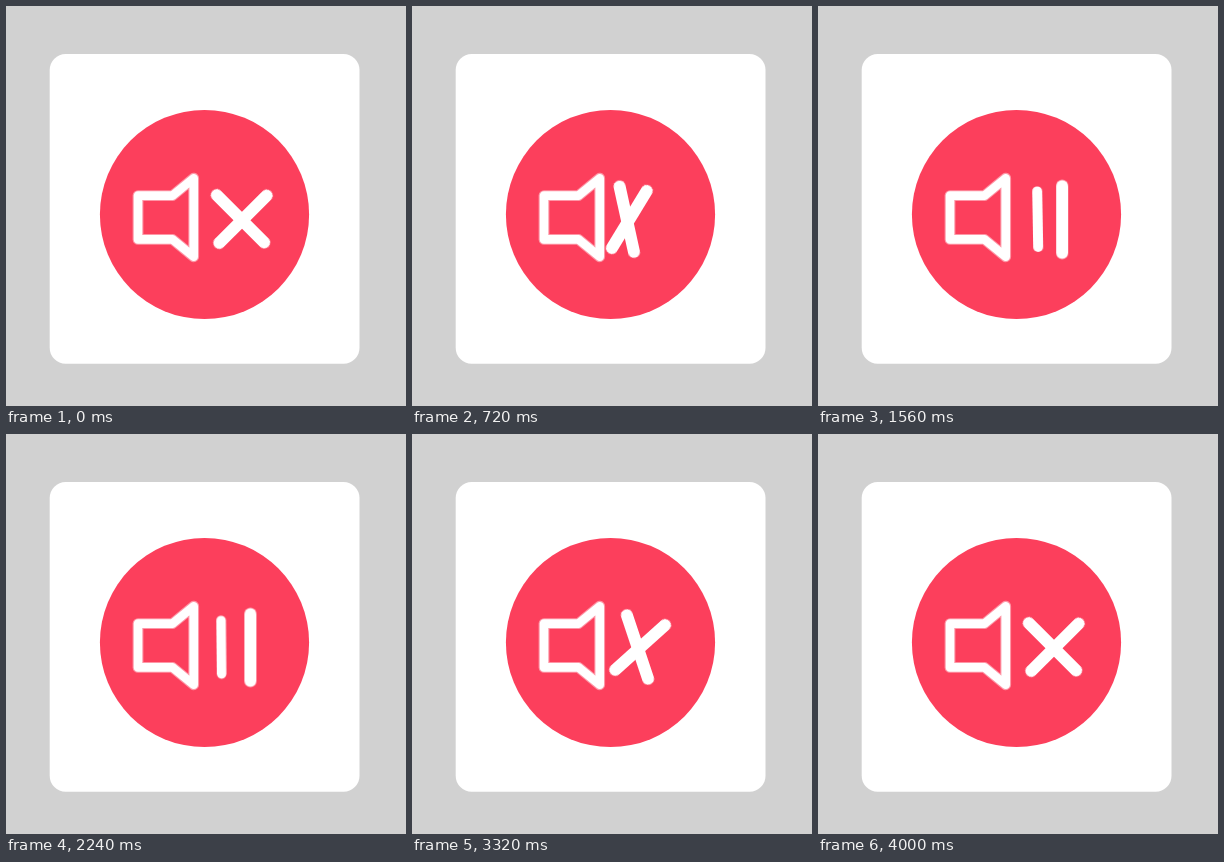
Animation, 400 px wide and 400 px high, one loop 4400 ms. Source, as an HTML page without scripts:

```html
<!DOCTYPE html>
<html lang="en">
<head>
<meta charset="utf-8">
<title>Mute toggle</title>
<style>
  html, body { margin: 0; width: 100%; height: 100%; overflow: hidden; background: #d1d1d1; }
  svg { display: block; width: 100%; height: 100%; }
  .icon { fill: none; stroke: #fff; stroke-linecap: round; stroke-linejoin: round; }
  .bar { stroke-width: 12; animation: 4400ms infinite ease-in-out; }
  .back { animation-name: back; }
  .front { animation-name: front; }

  /* Left bar: falling stroke of the cross, then the short wave */
  @keyframes back {
    0%, .9% { transform: translate(234.5px, 212.8px) rotate(-45deg) scale(1); }
    5.45% { transform: translate(238px, 213px) rotate(-50deg) scale(1); animation-timing-function: ease-in; }
    12.73% { transform: translate(225px, 213px) rotate(-22deg) scale(1); animation-timing-function: linear; }
    16.36% { transform: translate(215px, 213.2px) rotate(-12.5deg) scale(1); animation-timing-function: ease-out; }
    22%, 25.45% { transform: translate(187.5px, 213.5px) rotate(0deg) scale(1); }
    28.18% { transform: translate(185.5px, 213.5px) rotate(0deg) scale(1.04); }
    34.55% { transform: translate(220px, 213.2px) rotate(-1deg) scale(.83); }
    35.45% { transform: translate(219.7px, 213.2px) rotate(-1deg) scale(.83); }
    41.82%, 50% { transform: translate(214.8px, 213.2px) rotate(-.5deg) scale(.8); }
    53.64% { transform: translate(219px, 213.2px) rotate(-1deg) scale(.78); }
    61.82%, 66.8% { transform: translate(187.5px, 213.5px) rotate(0deg) scale(1); animation-timing-function: ease-in; }
    75.45% { transform: translate(225.4px, 213px) rotate(-18.2deg) scale(1); animation-timing-function: ease-out; }
    81.82% { transform: translate(238px, 213px) rotate(-50deg) scale(1); }
    88.18% { transform: translate(233.8px, 212.8px) rotate(-43deg) scale(1); }
    90.91%, 100% { transform: translate(234.5px, 212.8px) rotate(-45deg) scale(1); }
  }

  /* Right bar: rising stroke of the cross, then the long wave */
  @keyframes front {
    0%, .9% { transform: translate(237px, 213.3px) rotate(45deg); }
    9.1% { transform: translate(239px, 213.3px) rotate(59deg); animation-timing-function: ease-in; }
    12.73% { transform: translate(234px, 213.3px) rotate(56deg); animation-timing-function: linear; }
    16.36% { transform: translate(217.5px, 213.5px) rotate(31.5deg); animation-timing-function: ease-out; }
    23.64%, 25.45% { transform: translate(187.5px, 213.5px) rotate(0deg); }
    29.09% { transform: translate(184.8px, 213.5px) rotate(0deg); animation-timing-function: ease-in; }
    35.45% { transform: translate(244px, 213.5px) rotate(0deg); animation-timing-function: ease-out; }
    38.18% { transform: translate(255px, 213.5px) rotate(0deg); }
    41.82%, 50% { transform: translate(243.6px, 213.5px) rotate(0deg); }
    55% { transform: translate(255px, 213.5px) rotate(0deg); }
    63.64% { transform: translate(192px, 213.5px) rotate(0deg); animation-timing-function: ease-out; }
    65.45%, 66.8% { transform: translate(187.3px, 213.5px) rotate(0deg); animation-timing-function: ease-in; }
    75.45% { transform: translate(228px, 213.5px) rotate(48deg); animation-timing-function: ease-out; }
    80% { transform: translate(239.5px, 213.3px) rotate(57deg); }
    88.18% { transform: translate(236.2px, 213.3px) rotate(46deg); }
    90.91%, 100% { transform: translate(237px, 213.3px) rotate(45deg); }
  }
</style>
</head>
<body>
<svg viewBox="0 0 400 400">
  <defs>
    <path id="horn" d="M132 189.6H166.5L187.7 172.2V250.8L166.5 233.4H132Z"/>
  </defs>
  <rect x="43.7" y="48" width="309.8" height="309.7" rx="16" fill="#fff"/>
  <circle cx="198.5" cy="208.5" r="104.6" fill="#fc3f5c"/>
  <g class="icon">
    <use href="#horn" stroke-width="10.8" stroke-opacity=".45"/>
    <use href="#horn" stroke-width="8.6"/>
    <path class="bar back" d="M0-33.5V33.5"/>
    <path class="bar front" d="M0-33.5V33.5"/>
  </g>
</svg>
</body>
</html>
```
